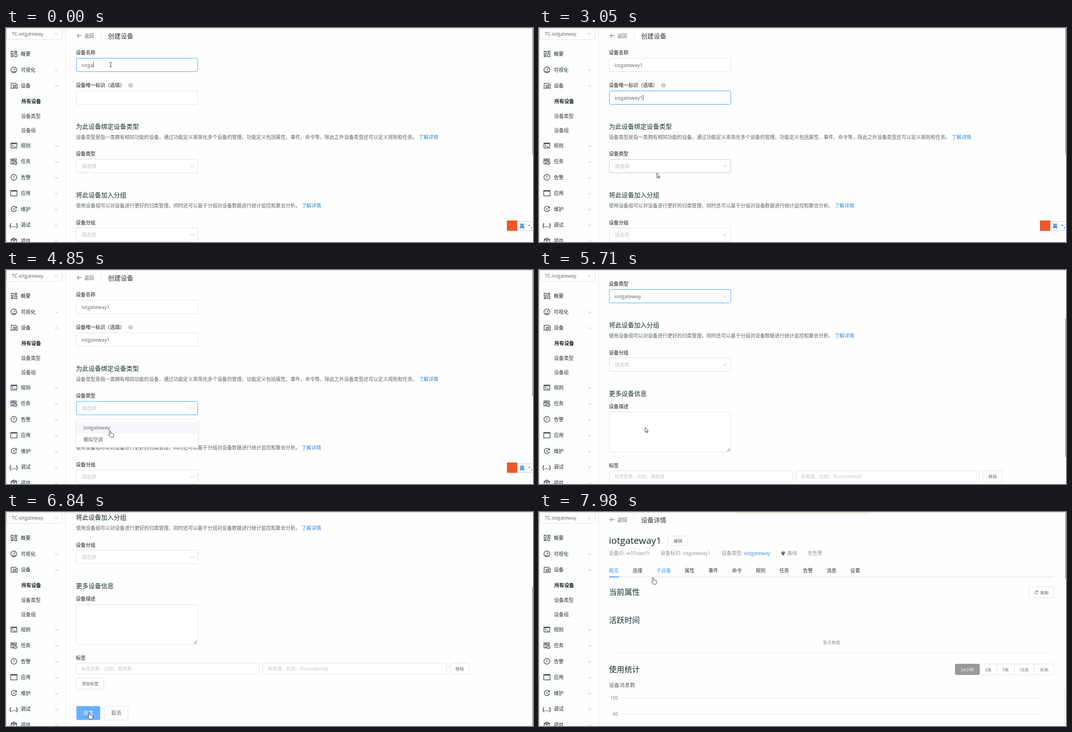
Write an HTML page that moves like this. It is 1172 px wide and 478 px high and loops after 8000 ms.

```html
<!DOCTYPE html>
<html lang="zh-CN">
<head>
<meta charset="utf-8">
<title>创建设备</title>
<style>
  html, body { margin: 0; width: 100%; height: 100%; overflow: hidden; background: #fefefe; }
  svg { display: block; width: 1172px; height: 478px; }
  text { font-family: "Open Sans", "Noto Sans CJK SC", "Noto Sans CJK", sans-serif; white-space: pre; }
  .line { fill: none; stroke: #4a4d52; stroke-width: 1.4; }
</style>
</head>
<body>
<svg id="stage" viewBox="0 0 1172 478"></svg>
<script>
const LOOP = 8000;
const INK = '#17302f', GREY = '#606266', PALE = '#c0c4cc', EDGE = '#dcdfe6', BLUE = '#409eff', LINK = '#3388dd';
const BASE = 10.85;

// ---- drawing helpers: y is the optical middle of a text line ----
const text = (x, y, str, { size = BASE, fill = GREY, bold, anchor = 'start', id = '' } = {}) =>
  `<text id="${id}" x="${x}" y="${y + size * 0.38}" font-size="${size}" fill="${fill}"
    font-weight="${bold ? 700 : 400}" text-anchor="${anchor}">${str}</text>`;
const box = (x, y, w, h, { id = '', fill = '#fff', stroke = EDGE, r = 3 } = {}) =>
  `<rect id="${id}" x="${x + 0.5}" y="${y + 0.5}" width="${w - 1}" height="${h - 1}" rx="${r}" fill="${fill}" stroke="${stroke}"/>`;
const bar = (x, y, w, h, fill, id = '') =>
  `<rect id="${id}" x="${x}" y="${y}" width="${w}" height="${h}" fill="${fill}"/>`;
const path = (d, extra = '') => `<path class="line" d="${d}" ${extra}/>`;
const chevron = (x, y, up, id = '') => {
  const s = up ? -1 : 1;
  return `<path id="${id}" d="M${x - 3.5} ${y - 1.75 * s}l3.5 ${3.5 * s} 3.5 ${-3.5 * s}" fill="none" stroke="#a8abb2"/>`;
};
const group = (id, ...parts) => `<g id="${id}">${parts.join('')}</g>`;
const label = (y, str) => text(155.5, y, str, { bold: true });
const heading = (y, str) => text(155.5, y, str, { size: 14, fill: INK });
const input = (y, id) => box(156, y, 271, 31, { id });
const hint = (x, y, str, size) => text(x, y, str, { size, fill: PALE });
const button = (x, y, w, h, str, size = 9.4) =>
  box(x, y, w, h) + text(x + w / 2, y + h / 2, str, { size, anchor: 'middle' });
const titleBar = str =>
  path('M168 17H158M162.500 12.500L158 17l4.500 4.500', 'style="stroke-width:1"') + text(174, 17.5, '返回') +
  bar(211, 11, 1, 12, EDGE) + text(227, 17.5, str, { size: 14, fill: '#303133' });

// ---- sidebar ----
const icons = {
  grid: 'M-6-6h4.500v6h-4.500zM2-6h4.500v3h-4.500zM2 0h4.500v6h-4.500zM-6 3h4.500v3h-4.500z',
  gauge: 'M-6.500 0a6.500 6.500 0 1 1 13 0a6.500 6.500 0 1 1-13 0M-4 4h8M0 1L3-3M-3.500 0v-1M0-4v1',
  devices: 'M6-5.500H-6V4M-8 5.500h6M-1.500-1h3v6.500h-3zM4-2.500h3.500v8H4z',
  rules: 'M-6.500-5.500h13v11h-13zM-6.500-4h13M-4-1.500l2.500 2-2.500 2M0 3h4',
  tasks: 'M0 5.500h-6.500v-11h12v4M-6.500-2h12M-2.500-5v10M0-5v3M0 3.500a3.500 3.500 0 1 1 7 0a3.500 3.500 0 1 1-7 0M3.500 1.500v2l1.500 1',
  alert: 'M-6.500 0a6.500 6.500 0 1 1 13 0a6.500 6.500 0 1 1-13 0M0-3.500v4.500M0 2.300v1.500',
  app: 'M-7-6h14v12h-14zM-7-4.500h14',
  upkeep: 'M5.500-3A6 6 0 1 0 6 1M6-6v3.500H2.500M0-3v3.500l2.500 1.500',
  debug: '',
  project: 'M0-6.500l6 3v7l-6 3-6-3v-7zM-6-3.500l6 3 6-3M0-.500v7M-3-5l6 3'
};
const menu = [
  ['概要', 58, 'grid'], ['可视化', 93.5, 'gauge'], ['设备', 129, 'devices'], ['规则', 262.5, 'rules'],
  ['任务', 298, 'tasks'], ['告警', 333.5, 'alert'], ['应用', 369, 'app'], ['维护', 404.5, 'upkeep'],
  ['调试', 440, 'debug'], ['项目', 475.5, 'project']
];
const sidebar = group('sidebar',
  bar(132, 0, 1, 478, '#e2e3e6'), box(1, -4, 124, 30), text(13, 13, 'TC-iotgateway', { size: 10.7 }), chevron(111.5, 13),
  ...menu.map(([name, y, icon], i) =>
    text(33, y, name, { fill: INK }) + (i ? chevron(112.5, y + 1, icon === 'devices') : '') +
    (icon === 'debug' ? text(17, y, '{...}', { size: 12, fill: '#4a4d52', anchor: 'middle', bold: true })
                      : path(icons[icon], `transform="translate(17.500 ${y})"`))),
  text(34.5, 164, '所有设备', { fill: '#10201f', bold: true }),
  text(33.5, 196.5, '设备类型', { fill: '#33393d' }), text(33.5, 229, '设备组', { fill: '#33393d' }));

// ---- create form ----
const form = group('form',
  titleBar('创建设备'),
  label(55, '设备名称'), input(67, 'field1'), text(168, 82.5, '', { size: 11.17, id: 'value1' }),
  label(128, '设备唯一标识（选填）'),
  '<circle cx="277" cy="128" r="5" fill="#c0c2c6"/>', text(277, 128, '?', { size: 8, fill: '#fff', bold: true, anchor: 'middle' }),
  input(140, 'field2'), text(168, 155.5, '', { size: 11.17, id: 'value2' }),
  heading(219.5, '为此设备绑定设备类型'),
  text(155.5, 244, '设备类型是指一类拥有相同功能的设备，通过功能定义来简化多个设备的管理。功能定义包括属性、事件、命令等，除此之外设备类型还可以定义规则和任务。'),
  text(918, 244, '了解详情', { fill: LINK }),
  label(281, '设备类型'), input(293, 'field3'), text(168, 308.5, '', { size: 11.17, id: 'value3' }),
  chevron(413.5, 308.5, false, 'closedMark'), chevron(413.5, 308.5, true, 'openMark'),
  heading(372.5, '将此设备加入分组'),
  text(155.5, 396.5, '使用设备组可以对设备进行更好的归类管理，同时还可以基于分组对设备数据进行统计监控和聚合分析。'),
  text(657.5, 396.5, '了解详情', { fill: LINK }),
  label(434.5, '设备分组'), input(446), hint(168, 462, '请选择'), chevron(413.5, 462),
  heading(525.5, '更多设备信息'), label(554.5, '设备描述'), box(156, 567, 271, 90),
  path('M418 655l6.500-6.500M421.500 655l3-3', 'style="stroke-width:1"'),
  label(687, '标签'),
  box(156, 698, 408, 26), hint(168, 711, '标签名称，比如：服务商', 10.1),
  box(571, 698, 409, 26), hint(583, 711, '标签值，比如：PlumvaleHub', 10.1),
  button(987, 698, 44, 26, '移除'), button(156, 731, 62, 26, '添加标签'),
  box(156, 794, 54, 32, { id: 'submit', fill: BLUE, stroke: 'none' }),
  text(183, 810, '创建', { fill: '#fff', anchor: 'middle' }), button(218, 794, 54, 32, '取消', BASE),
  group('popup',
    '<rect x="156" y="334" width="271" height="62" rx="3" fill="#fff" stroke="#e4e7ed" filter="url(#shade)"/>',
    '<path d="M183 334l5-4.500 5 4.500" fill="#fff" stroke="#e4e7ed"/>',
    bar(157, 339, 270, 26, '#f5f7fa', 'hover'),
    text(172, 352, 'iiotgateway', { size: 11.2 }), text(172, 378.5, '模拟空调')));

// ---- device detail ----
const tabs = ['概览', '连接', '子设备', '属性', '事件', '命令', '规则', '任务', '告警', '消息', '设置'];
const spans = [['24小时', 925, 980], ['3天', 980, 1018], ['7天', 1018, 1057], ['15天', 1057, 1101], ['30天', 1101, 1146]];
const section = (y, str) => text(155.5, y, str, { size: 17.2, fill: INK });
const note = (x, str, fill = '#909399') => text(x, 92, str, { size: 11, fill });
const detail = group('detail',
  titleBar('设备详情'),
  text(155.5, 63.5, 'iotgateway1', { size: 20.75, fill: '#1f2a2c' }), button(287, 53, 44, 22, '编辑'),
  note(155.5, '设备ID: w07owz7r'), note(270, '设备标识: iotgateway1'), note(406, '设备类型: '), note(455.5, 'iiotgateway', LINK),
  '<path d="M539 90h8v2.500l-2.500 2.500v2h-3v-2l-2.500-2.500zM540.500 86.500h1.500v3.500h-1.500zM544 86.500h1.500v3.500h-1.500z" fill="#606266"/>',
  note(552, '离线'), note(597, '无告警'),
  ...tabs.map((name, i) => text(155.5 + i * 52.6 + (i > 2 ? 10.8 : 0), 131,
    name, { fill: i ? '#303133' : BLUE, id: i === 2 ? 'subTab' : '' })),
  bar(156, 144.5, 990, 1.5, '#dfe2e8'), bar(156, 144, 22, 2, BLUE),
  section(178, '当前属性'), box(1089, 167, 57, 25),
  path('M1109 177.500a3.500 3.500 0 1 0 .5 3M1109.500 175.500v2.500h-2.500', 'style="stroke-width:1"'), text(1115, 180, '刷新', { size: 9.4 }),
  section(241, '活跃时间'), text(632, 291.5, '暂无数据', { size: 9.4, fill: '#909399' }), bar(156, 314, 990, 1, '#ebeef5'),
  section(351, '使用统计'), box(925, 339, 221, 25),
  ...spans.map(([name, a, b], i) =>
    (i ? bar(a, 339, 1, 25, EDGE) : box(a, 339, b - a, 25, { fill: '#999', stroke: '#999' })) +
    text((a + b) / 2, 352, name, { size: 9.4, fill: i ? GREY : '#fff', anchor: 'middle' })),
  text(155.5, 386.5, '设备消息数', { size: 11.7 }),
  ...[100, 80].map((n, i) => text(176, 415.5 + i * 36, n, { size: 10, fill: '#777a80', anchor: 'end' }) +
    bar(178, 415 + i * 36, 942, 1, '#e6e9ef')),
  bar(1169, 392, 1, 86, '#e4e4e6'));

const ime = group('ime',
  '<rect x="1125" y="432.500" width="60" height="20" fill="#fff" stroke="#b9d6ef"/>', bar(1114, 430, 23, 23, '#f0562a'),
  text(1142, 443, '英', { size: 11.5, fill: '#1670cc', bold: true }), '<circle cx="1164" cy="441" r="1.500" fill="#1670cc"/>',
  text(1167, 441, ',', { size: 13, fill: '#1670cc', bold: true }));

const pointer = group('pointer',
  '<path id="beam" d="M-2.500-5h2l.5.500.5-.500h2M0-4.500v9M-2.500 5h2l.5-.500.5.500h2" fill="none" stroke="#222"/>',
  '<path id="arrow" d="M0 0v10.500l2.400-2.200 1.600 3.600 1.700-.8-1.600-3.400h3.300z" fill="#fff" stroke="#222" stroke-width=".9"/>',
  '<path id="hand" d="M-1.300 1.300a1.300 1.300 0 0 1 2.600 0V5.500l1.100-.3 1.100.9 1.200-.4 1.200 1 1-.2q1.300.4 1.300 2V11L7 14.800H.8L-3 10q-.6-1.600.9-1.400l.8.800z" fill="#fff" stroke="#222" stroke-width=".9"/>');

document.getElementById('stage').innerHTML =
  `<defs><filter id="shade" x="-10%" y="-20%" width="120%" height="150%">
    <feDropShadow dx="0" dy="1.500" stdDeviation="2.500" flood-color="#000" flood-opacity=".1"/></filter></defs>` +
  bar(0, 0, 1172, 478, '#fefefe') + form + detail + bar(0, 0, 1, 13, 'none', 'caret') +
  box(434, -40, 295, 45, { id: 'toast', fill: '#f0f9eb', stroke: '#e6f5de' }) + sidebar + bar(1170, -28, 2, 310, '#aeb0b4', 'thumb') + ime +
  bar(0, 0, 1172, 1, '#bdbdbd') + bar(0, 0, 1, 478, '#b8b8b8') + pointer;

// ---- timeline: every row starts with its time, values hold until the next row ----
const NAME = 'iotgateway1';
const typed = [[0, 5], [150, 6], [280, 7], [580, 8], [740, 10], [1190, 11]];
const moves = [
  [0, 233, 82, 'beam'], [1600, 239, 81, 'beam'], [1740, 243, 102, 'arrow'], [1890, 246, 135, 'arrow'],
  [2030, 247, 155, 'beam'], [2620, 249, 163, 'beam'], [2760, 251, 205, 'arrow'], [2910, 256, 270, 'arrow'],
  [3050, 262, 324, 'arrow'], [3190, 262, 449, 'hand'], [3340, 262, 360, 'arrow'], [3500, 258, 308, 'hand'],
  [3660, 257, 306, 'hand'], [3790, 250, 325, 'arrow'], [3940, 241, 344, 'hand'], [4090, 234, 356, 'hand'],
  [4240, 231.5, 359, 'hand'], [5280, 232, 357, 'arrow'], [5700, 236, 352, 'arrow'], [5980, 238, 349, 'arrow'],
  [6390, 231, 368, 'arrow'], [6540, 212, 405, 'arrow'], [6690, 192, 440, 'hand'], [6830, 185, 448, 'hand'],
  [7130, 202, 385, 'arrow'], [7270, 223, 314, 'arrow'], [7400, 235, 255, 'arrow'], [7550, 243, 205, 'arrow'],
  [7700, 249, 165, 'arrow'], [7850, 251, 150, 'hand'], [7980, 253.5, 146.5, 'hand']
];
const scrolls = [[0, 0], [5560, 110], [5700, 250], [5840, 361], [7130, 0]];
const formFade = [[0, 1], [7130, 0.6], [7270, 0.14], [7400, 0]];
const detailFade = [[0, 0], [7400, 0.2], [7550, 0.8], [7700, 1]];
const focus = [[0, 1], [2180, 2], [3500, 3], [7130, 0]];
const carets = [[0, 1], [2180, 2], [3500, 3], [3940, 0], [4400, 3], [4850, 0]];

const at = (rows, t) => rows.findLast(row => row[0] <= t);
const value = (rows, t) => at(rows, t)[1];
const el = {};
document.querySelectorAll('[id]').forEach(node => { if (node.id) el[node.id] = node; });
const show = (id, on) => { el[id].style.display = on ? '' : 'none'; };
const within = (t, a, b) => t >= a && t < b;
const write = (id, str) => { if (el[id].textContent !== str) el[id].textContent = str; };

function draw(t) {
  write('value1', NAME.slice(0, value(typed, t)));
  write('value2', t >= 2620 ? NAME : '');
  write('value3', t >= 5280 ? 'iiotgateway' : '请选择');
  el.value3.setAttribute('fill', t >= 5280 ? GREY : PALE);

  const active = value(focus, t);
  [1, 2, 3].forEach(n => {
    const warm = n === 3 && within(t, 2910, 3190);
    el['field' + n].setAttribute('stroke', n === active ? BLUE : warm ? PALE : EDGE);
  });

  const blink = value(carets, t);
  show('caret', blink);
  if (blink) {
    const used = blink < 3 ? el['value' + blink].getComputedTextLength() : 0;
    el.caret.setAttribute('x', Math.round(168 + used));
    el.caret.setAttribute('y', [75, 149, 302][blink - 1]);
    el.caret.setAttribute('fill', '#444');
  }

  const open = within(t, 3660, 5280);
  show('popup', open);
  show('hover', t >= 3940);
  show('openMark', open);
  show('closedMark', !open);
  el.submit.setAttribute('fill', within(t, 6690, 7130) ? '#66b1ff' : BLUE);

  const scroll = value(scrolls, t), inDetail = t >= 7400;
  el.form.setAttribute('transform', `translate(0 ${-scroll})`);
  el.form.setAttribute('opacity', value(formFade, t));
  el.detail.setAttribute('opacity', value(detailFade, t));
  el.thumb.setAttribute('y', -28 + scroll * 196 / 361);
  el.thumb.setAttribute('height', inDetail ? 178 : 310);
  el.subTab.setAttribute('fill', t >= 7850 ? BLUE : '#303133');
  show('toast', t >= 7550);
  show('ime', t < 5420);

  const [, x, y, shape] = at(moves, t);
  el.pointer.setAttribute('transform', `translate(${x} ${y})`);
  ['beam', 'arrow', 'hand'].forEach(id => show(id, id === shape));
}

const start = performance.now();
function tick() {
  draw((performance.now() - start) % LOOP);
  requestAnimationFrame(tick);
}
tick();
</script>
</body>
</html>
```
